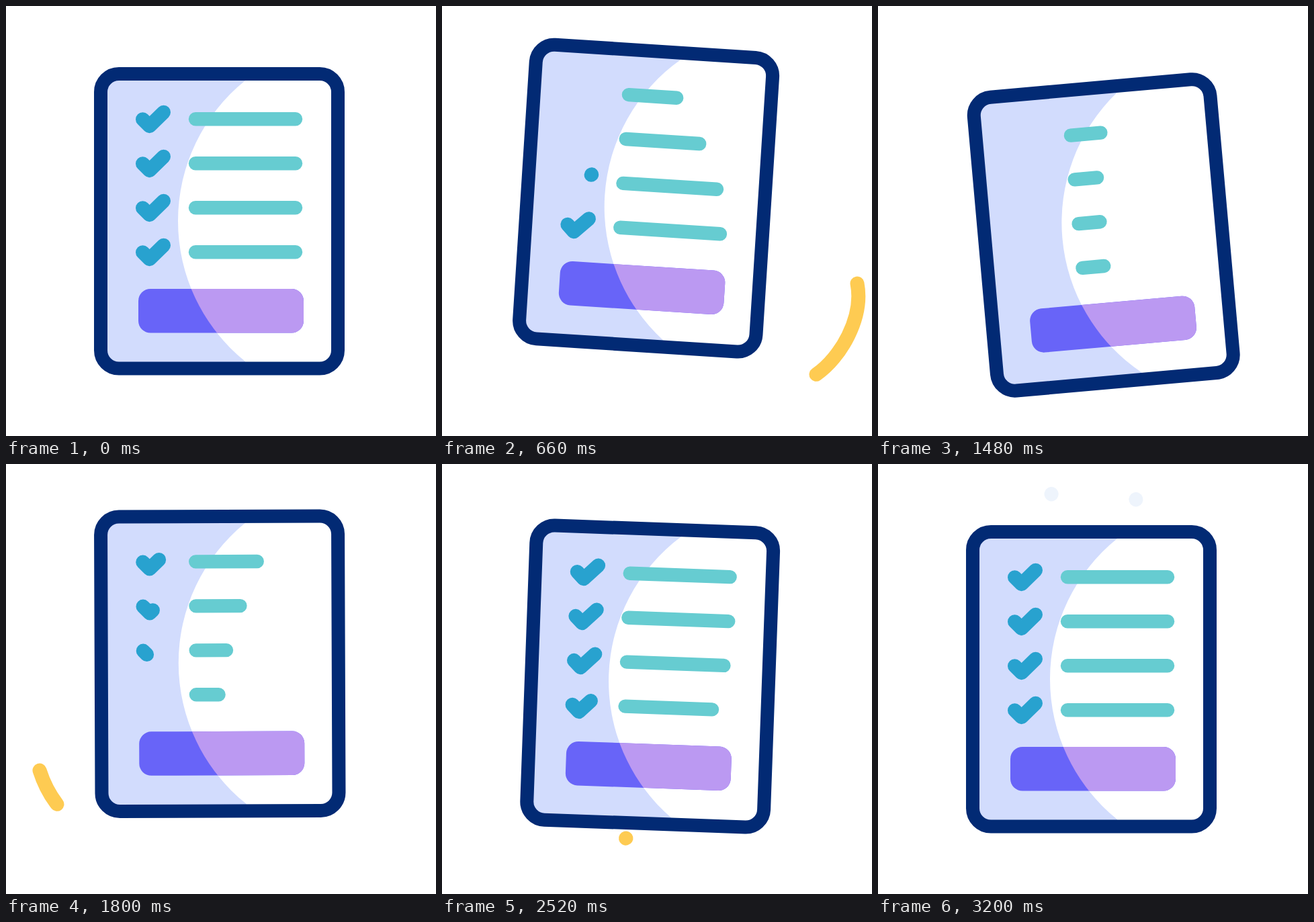
Recreate the animation shown at these times as an HTML page. Size 640 by 640 pixels, loop 3420 ms.

```html
<!DOCTYPE html>
<html lang="en">
<head>
<meta charset="utf-8">
<title>Checklist</title>
<style>
  html, body { margin: 0; width: 100%; height: 100%; overflow: hidden; background: #fff; }
  svg { display: block; width: 100vw; height: 100vh; }
  .stroke { fill: none; stroke-width: 21; stroke-linecap: round; stroke-linejoin: round; }
  .tick { stroke: #28a2cf; }
  .row { stroke: #66ccd1; stroke-width: 20.4; }
  .swoosh { stroke: #fecb52; }
  .spark { stroke: #eef4fc; }
</style>
</head>
<body>
<svg viewBox="0 0 640 640">
  <defs>
    <clipPath id="disc"><circle cx="524.4" cy="320" r="268.4"/></clipPath>
  </defs>
  <g id="sparks"></g>
  <g id="card">
    <path fill="#d2dcfd" d="M356 105 V111 A268.4 268.4 0 0 0 356 529 V535 H168 A24 24 0 0 1 144 511 V129 A24 24 0 0 1 168 105Z"/>
    <rect x="197" y="421" width="246" height="65.5" rx="18" fill="#6864f8"/>
    <rect x="197" y="421" width="246" height="65.5" rx="18" fill="#bb99f2" clip-path="url(#disc)"/>
    <rect x="141" y="101" width="353" height="438.5" rx="27" fill="none" stroke="#022a74" stroke-width="20"/>
    <g id="list"></g>
  </g>
  <g id="swooshes"></g>
</svg>
<script>
const LOOP = 3420;
const PIVOT = [168, 108];
const LIFT = [[180, 0], [705, -44], [1335, 44], [2030, -44], [2740, 0]];
const TILT = [[400, 0], [805, 5.1], [1465, -5.1], [2155, 5.1], [2810, 0]];

// [erase start, erase end, draw start, draw end]
const TICKS = [
  [180, 490, 1500, 1940],
  [260, 590, 1590, 2030],
  [340, 690, 1680, 2120],
  [680, 1180, 1815, 2730]
];

// head and tail run along the path; off is when the leftover dot goes
const SWOOSHES = [
  { d: 'M618 413 C628 465 592 525 556 549 C520 573 478 578 432 555', head: [340, 950], tail: [860, 1250], off: 1300 },
  { d: 'M50 456 C75 535 150 585 274 557', head: [1620, 2220], tail: [2120, 2520], off: 2560 }
];
const SPARKS = [
  'M320 146 C314 40 270 6 258 45',
  'M320 146 C326 40 370 8 384 53'
].map(d => ({ d, head: [2740, 3040], tail: [2840, 3200], off: LOOP }));

const byId = id => document.getElementById(id);
const ease = u => (1 - Math.cos(Math.PI * Math.min(1, Math.max(0, u)))) / 2;
const span = (t, a, b) => ease((t - a) / (b - a));

function track(keys, t) {
  return keys.slice(1).reduce((v, [end, to], i) =>
    v + (to - keys[i][1]) * span(t, keys[i][0], end), keys[0][1]);
}

function addStroke(parent, kind, d) {
  const path = document.createElementNS('http://www.w3.org/2000/svg', 'path');
  path.setAttribute('class', 'stroke ' + kind);
  path.setAttribute('d', d);
  byId(parent).append(path);
  return { path, size: path.getTotalLength() };
}

// A short minimum dash keeps the round dot visible at either end.
function trim({ path, size }, from, to, shown) {
  const begin = Math.min(from * size, size - 0.6);
  path.style.display = shown ? '' : 'none';
  path.style.strokeDasharray = `${Math.max(0.5, to * size - begin)} ${size * 3}`;
  path.style.strokeDashoffset = -begin;
}

const rows = TICKS.map((_, i) => {
  const y = 168.2 + i * 66;
  return {
    y,
    tick: addStroke('list', 'tick', `M203.5 ${y + 0.5} l10 10 l21 -20.5`),
    line: addStroke('list', 'row', `M282 ${y} H431`)
  };
});
const runners = [
  ...SWOOSHES.map(s => ({ ...s, stroke: addStroke('swooshes', 'swoosh', s.d) })),
  ...SPARKS.map(s => ({ ...s, stroke: addStroke('sparks', 'spark', s.d) }))
];

function draw(t) {
  byId('card').setAttribute('transform',
    `translate(0 ${track(LIFT, t)}) rotate(${track(TILT, t)} ${PIVOT})`);

  rows.forEach(({ y, tick, line }, i) => {
    const [e0, e1, d0, d1] = TICKS[i];
    if (t < d0) trim(tick, span(t, e0, e1), 1, t < e1);
    else trim(tick, 0, span(t, d0, d1), true);

    const lag = i * 157;
    const full = 1 - span(t, 213 + lag, 953 + lag) + span(t, 1247 + lag, 2343 + lag);
    line.path.setAttribute('d', `M282 ${y} h${32 + 117 * full}`);
  });

  for (const { stroke, head, tail, off } of runners) {
    trim(stroke, span(t, ...tail), span(t, ...head), t > head[0] && t < off);
  }
}

const start = performance.now();
function tick(now) {
  draw(Math.max(0, now - start) % LOOP);
  requestAnimationFrame(tick);
}
draw(0);
requestAnimationFrame(tick);
</script>
</body>
</html>
```
